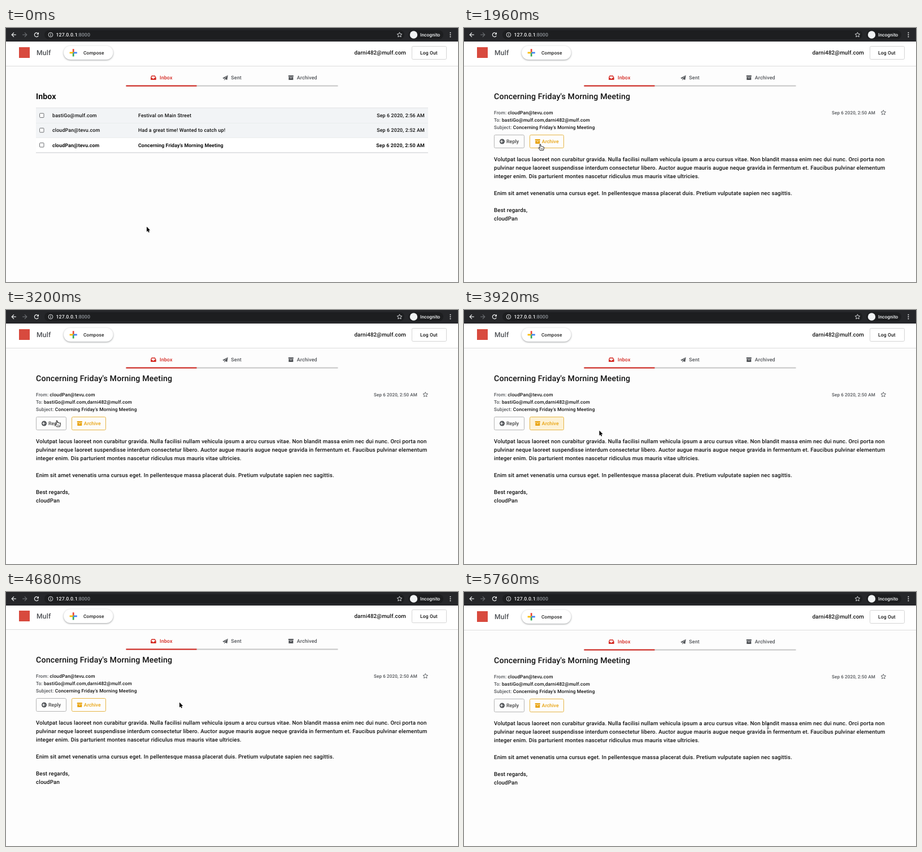
Write an HTML page with a canvas that moves like this. It is 800 by 450 pixels and loops after 5800 ms.

```html
<!DOCTYPE html>
<html lang="en">
<head>
<meta charset="utf-8">
<title>Inbox</title>
<style>
html, body { margin: 0; width: 100%; height: 100%; overflow: hidden; background: #fdfdfd; }
canvas { display: block; width: 800px; height: 450px; }
</style>
</head>
<body>
<canvas id="stage"></canvas>
<script>
const LOOP = 5800, STEP = 40, OPEN_AT = 1840;
const SCROLL = [4560, 4720];
const INK = '#111', GREY = '#505357', RED = '#d3241d', GOLD = '#e8a20c';
const ME = 'darni482@mulf.com', BASTI = 'bastiGo@mulf.com', CLOUD = 'cloudPan@tevu.com';
const SUBJECT = "Concerning Friday's Morning Meeting";

const canvas = document.getElementById('stage');
const ratio = window.devicePixelRatio || 1;
canvas.width = 800 * ratio;
canvas.height = 450 * ratio;
const c = canvas.getContext('2d');
c.scale(ratio, ratio);
c.textRendering = 'geometricPrecision';

// time, x, y of the pointer's hot spot
const PATH = [
  [0, 249, 352], [40, 249, 352], [220, 222, 304], [320, 223, 317], [560, 223, 317],
  [1120, 132, 205], [1720, 132, 205], [1920, 135, 206], [2360, 135, 206],
  [2680, 328, 216], [2800, 328, 216], [3200, 90, 196], [3440, 90, 196],
  [3640, 140, 202], [3840, 165, 206], [3920, 239.5, 213.5], [4120, 388, 212],
  [4220, 388, 212], [4640, 307, 195.5], [4760, 307, 195.5], [5760, 538, 237.5]
];

function pointer(t) {
  let i = 1;
  while (i < PATH.length - 1 && PATH[i][0] < t) i++;
  const [t0, x0, y0] = PATH[i - 1], [t1, x1, y1] = PATH[i];
  const k = Math.min(1, (t - t0) / (t1 - t0));
  const e = k * k * (3 - 2 * k);
  return [x0 + (x1 - x0) * e, y0 + (y1 - y0) * e];
}

function text(s, x, y, size, o = {}) {
  c.font = `${o.weight || 500} ${size}px Roboto, Arial, sans-serif`;
  c.letterSpacing = (o.gap ?? 0.13) + 'px';
  c.textAlign = o.align || 'left';
  c.fillStyle = o.color || INK;
  c.fillText(s, x, y);
}

function rect(x, y, w, h, color) {
  c.fillStyle = color;
  c.fillRect(x, y, w, h);
}

function pill(x, y, w, h, r, fill, stroke) {
  c.beginPath();
  c.roundRect(x, y, w, h, r);
  if (fill) { c.fillStyle = fill; c.fill(); }
  if (stroke) { c.strokeStyle = stroke; c.lineWidth = 1; c.stroke(); }
}

function disc(x, y, r, color) {
  c.beginPath();
  c.arc(x, y, r, 0, 7);
  c.fillStyle = color;
  c.fill();
}

function poly(points, fill, stroke, width = 1) {
  c.beginPath();
  for (let i = 0; i < points.length; i += 2) c.lineTo(points[i], points[i + 1]);
  if (fill) { c.closePath(); c.fillStyle = fill; }
  if (stroke) { c.strokeStyle = stroke; c.lineWidth = width; c.stroke(); }
  if (fill) c.fill();
}

function at(x, y, draw) {
  c.save();
  c.translate(x, y);
  draw();
  c.restore();
}

function shadowed(blur, dy, color, draw) {
  c.save();
  c.shadowBlur = blur * ratio;
  c.shadowOffsetY = dy * ratio;
  c.shadowColor = color;
  draw();
  c.restore();
}

function star(x, y, r, color) {
  c.beginPath();
  for (let i = 0; i < 10; i++) {
    const a = i * Math.PI / 5 - Math.PI / 2, d = i % 2 ? r * 0.48 : r;
    c.lineTo(x + d * Math.cos(a), y + d * Math.sin(a));
  }
  c.closePath();
  c.strokeStyle = color;
  c.lineWidth = 0.9;
  c.stroke();
}

function arrowLeft(x, y, r, color, width) {
  poly([x + r, y, x - r, y], null, color, width);
  poly([x, y - r, x - r, y, x, y + r], null, color, width);
}

function boxIcon(x, y, color) {
  rect(x - 4.5, y - 4, 9, 2.2, color);
  rect(x - 4, y - 1.2, 8, 5.2, color);
  rect(x - 1.4, y, 2.8, 0.8, '#fff');
}

function browserBar() {
  rect(0, 0, 800, 24, '#26272a');
  pill(68, 4, 637, 16, 8, '#1d1e20');
  pill(712, 4, 62, 16, 8, '#1d1e20');
  arrowLeft(14, 12, 3.8, '#f1f3f4', 1.2);
  at(33, 12, () => { c.scale(-1, 1); arrowLeft(0, 0, 3.8, '#6c6e72', 1.2); });
  c.beginPath();
  c.arc(54, 12, 3.6, 0.4, 5.5);
  c.strokeStyle = '#f1f3f4';
  c.lineWidth = 1.2;
  c.stroke();
  poly([58, 7.6, 58, 11.4, 54.2, 11.4], '#f1f3f4');
  c.beginPath();
  c.arc(79, 12, 3.9, 0, 7);
  c.lineWidth = 0.9;
  c.stroke();
  rect(78.5, 11.5, 1, 2.6, '#f1f3f4');
  rect(78.5, 9.8, 1, 1, '#f1f3f4');
  text('127.0.0.1', 88.5, 15.2, 8.8, { color: '#f5f5f5', gap: 0.1 });
  text(':8000', 126.2, 15.2, 8.8, { color: '#8f9499', gap: 0.1 });
  star(696.5, 12.2, 4.5, '#e8eaed');
  disc(721.5, 12, 6.7, '#f1f3f4');
  text('Incognito', 733, 15, 8.3, { color: '#f1f3f4', gap: 0.06 });
  for (const y of [8.6, 12, 15.4]) disc(786.5, y, 1, '#f1f3f4');
}

function plus(x, y) {
  const a = 6.6, b = 1.35;
  rect(x - b, y - a, 2 * b, a + b, '#ea4335');
  rect(x - b, y - b, 2 * b, a + b, '#34a853');
  poly([x - a, y - b, x + b, y - b, x - b, y + b, x - a, y + b], '#fbbc05');
  poly([x + b, y - b, x + a, y - b, x + a, y + b, x - b, y + b], '#4285f4');
}

function header() {
  rect(0, 67, 800, 1, '#dcdcdc');
  rect(23, 34, 19, 19, '#d84a3e');
  text('Mulf', 54, 48, 12.22, { color: '#505357' });
  shadowed(3, 1, 'rgba(60,64,67,.5)', () => pill(102, 31.5, 87.5, 24.5, 12.25, '#fff'));
  plus(119.2, 43.8);
  text('Compose', 137, 46.8, 8.33, { color: '#222' });
  text(ME, 708, 47, 9.78, { align: 'right' });
  pill(718.5, 32.5, 61, 23, 2, '#fff', '#d4d4d4');
  text('Log Out', 733, 46.9, 8.5);
}

function tabs() {
  rect(212.5, 101.5, 375, 2, '#c6c6c6');
  rect(212.5, 101.5, 125, 2, RED);
  at(260.7, 88, () => {
    poly([-4.2, 0, -2.6, -3, 2.6, -3, 4.2, 0, 4.2, 3, -4.2, 3], null, RED, 1.4);
    poly([-4.6, 0.3, -1.8, 0.3, -1, 1.7, 1, 1.7, 1.8, 0.3, 4.6, 0.3, 4.6, 3.6, -4.6, 3.6], RED);
  });
  at(388, 88, () => {
    poly([-4.8, 0.8, 4.8, -4.6, -2.2, 2], GREY);
    poly([4.8, -4.6, 3.4, 4, -1.2, 2.2], GREY);
    poly([-1.9, 2.6, -0.2, 3.1, -1.9, 4.8], GREY);
  });
  boxIcon(504.3, 88, GREY);
  text('Inbox', 272, 91.2, 8.89, { color: RED });
  text('Sent', 398.3, 91.2, 8.89, { color: GREY });
  text('Archived', 514.8, 91.2, 8.89, { color: GREY });
}

function row(y, from, title, date, unread) {
  const style = unread ? { weight: 700, gap: 0.05 } : {};
  rect(53, y, 694, 26.4, unread ? '#fff' : '#f2f4f6');
  rect(53, y + 26, 694, 1, '#c9cbcd');
  pill(59.6, y + 9.2, 7.4, 7.4, 1, '#fff', '#6a6d70');
  text(from, 82, y + 16.2, 8.89, style);
  text(title, 234, y + 16.2, 8.89, style);
  text(date, 741, y + 16.2, 8.89, { ...style, gap: 0.13, align: 'right' });
}

function inbox(hover) {
  text('Inbox', 53, 126.3, 14.22, { weight: 700, gap: 0.05 });
  rect(53, 141.5, 694, 1, '#c9cbcd');
  row(142, BASTI, 'Festival on Main Street', 'Sep 6 2020, 2:56 AM');
  row(168.2, CLOUD, 'Had a great time! Wanted to catch up!', 'Sep 6 2020, 2:52 AM');
  if (hover) shadowed(3, 1, 'rgba(60,64,67,.5)', () => rect(53, 194.6, 694, 26, '#fff'));
  row(194.4, CLOUD, SUBJECT, 'Sep 6 2020, 2:50 AM', true);
}

function field(label, value, y) {
  text(label, 53, y, 8.44, { color: GREY });
  const w = c.measureText(label + ' ').width;
  text(value, 53 + w, y, 8.44);
}

const fade = (t, from, to) =>
  Math.max(0, Math.min(1, (t - from) / 150, 1 - (t - to) / 150));

function message(t) {
  const reply = fade(t, 3200, 3500);
  const archive = Math.max(fade(t, 2000, 2440), fade(t, 3000, 3060), fade(t, 3560, 3880));
  text(SUBJECT, 53, 126.2, 14.22);
  field('From:', CLOUD, 153);
  field('To:', BASTI + ',' + ME, 166.2);
  field('Subject:', SUBJECT, 179.3);
  text('Sep 6 2020, 2:50 AM', 728, 152.7, 8.1, { align: 'right', color: GREY, gap: 0.1 });
  star(742.3, 150, 4.5, GREY);

  pill(53.5, 189.5, 53, 23, 2, `rgba(95,99,104,${0.12 * reply})`, '#b4b4b4');
  disc(67.5, 201, 4.5, GREY);
  arrowLeft(67.4, 201, 2.3, '#fff', 1.1);
  text('Reply', 75, 204.2, 8.89, { color: '#444', gap: 0.05 });

  pill(116.5, 189.5, 60, 23, 2, `rgba(250,190,50,${0.26 * archive})`, '#e6b545');
  boxIcon(130.3, 201, GOLD);
  text('Archive', 137.8, 204.2, 8.75, { color: GOLD, gap: 0.05 });

  [
    'Volutpat lacus laoreet non curabitur gravida. Nulla facilisi nullam vehicula ipsum a arcu cursus vitae. Non blandit massa enim nec dui nunc. Orci porta non',
    'pulvinar neque laoreet suspendisse interdum consectetur libero. Auctor augue mauris augue neque gravida in fermentum et. Faucibus pulvinar elementum',
    'integer enim. Dis parturient montes nascetur ridiculus mus mauris vitae ultricies.',
    '',
    'Enim sit amet venenatis urna cursus eget. In pellentesque massa placerat duis. Pretium vulputate sapien nec sagittis.',
    '',
    'Best regards,',
    'cloudPan'
  ].forEach((line, i) => text(line, 53, 235.6 + i * 15, 9.78));
}

function arrow() {
  const p = [0, 0, 0, 9, 2, 7.2, 3.4, 10.3, 4.9, 9.6, 3.5, 6.6, 6.2, 6.4];
  poly([...p, 0, 0], '#000', '#fff', 1.3);
}

function hand() {
  c.lineJoin = 'round';
  const p = [-0.9, 0, 0.7, 0, 1.2, 3.7, 2.6, 3.5, 3.2, 4.2, 4.6, 4, 5.2, 4.8, 6.4, 5,
    6.6, 7.2, 5.4, 10.8, -0.4, 10.8, -3, 6.6, -2.6, 5.6, -0.6, 7];
  c.beginPath();
  for (let i = 0; i < p.length; i += 2) c.lineTo(p[i], p[i + 1]);
  c.closePath();
  c.fillStyle = '#fff';
  c.fill();
  c.strokeStyle = '#111';
  c.lineWidth = 0.9;
  c.stroke();
  for (const x of [1.2, 2.8, 4.3]) poly([x, 7, x, 9.2], null, '#111', 0.6);
}

function beam() {
  poly([0, -4.2, 0, 4.2], null, '#222', 0.9);
  for (const s of [-1, 1]) poly([-1.9, 4.8 * s, 0, 3.9 * s, 1.9, 4.8 * s], null, '#222', 0.8);
}

const within = (p, x0, y0, x1, y1) => p[0] >= x0 && p[0] <= x1 && p[1] >= y0 && p[1] <= y1;

function render(t) {
  const opened = t >= OPEN_AT, p = pointer(t);
  const onRow = !opened && within(p, 53, 195, 747, 221);
  const onButton = opened && (within(p, 53, 189, 107, 213) || within(p, 116, 189, 177, 213));
  const onText = opened && within(p, 53, 226, 747, 343);

  rect(0, 0, 800, 450, '#fdfdfd');
  at(0, t >= SCROLL[0] && t < SCROLL[1] ? -1 : 0, () => {
    rect(0, 24, 800, 43, '#fff');
    header();
    tabs();
    if (opened) message(t);
    else inbox(onRow);
  });
  browserBar();
  at(p[0], p[1], onRow || onButton ? hand : onText ? beam : arrow);
}

const start = performance.now();
function tick() {
  const t = (performance.now() - start) % LOOP;
  render(Math.floor(t / STEP) * STEP);
  requestAnimationFrame(tick);
}
tick();
</script>
</body>
</html>
```
